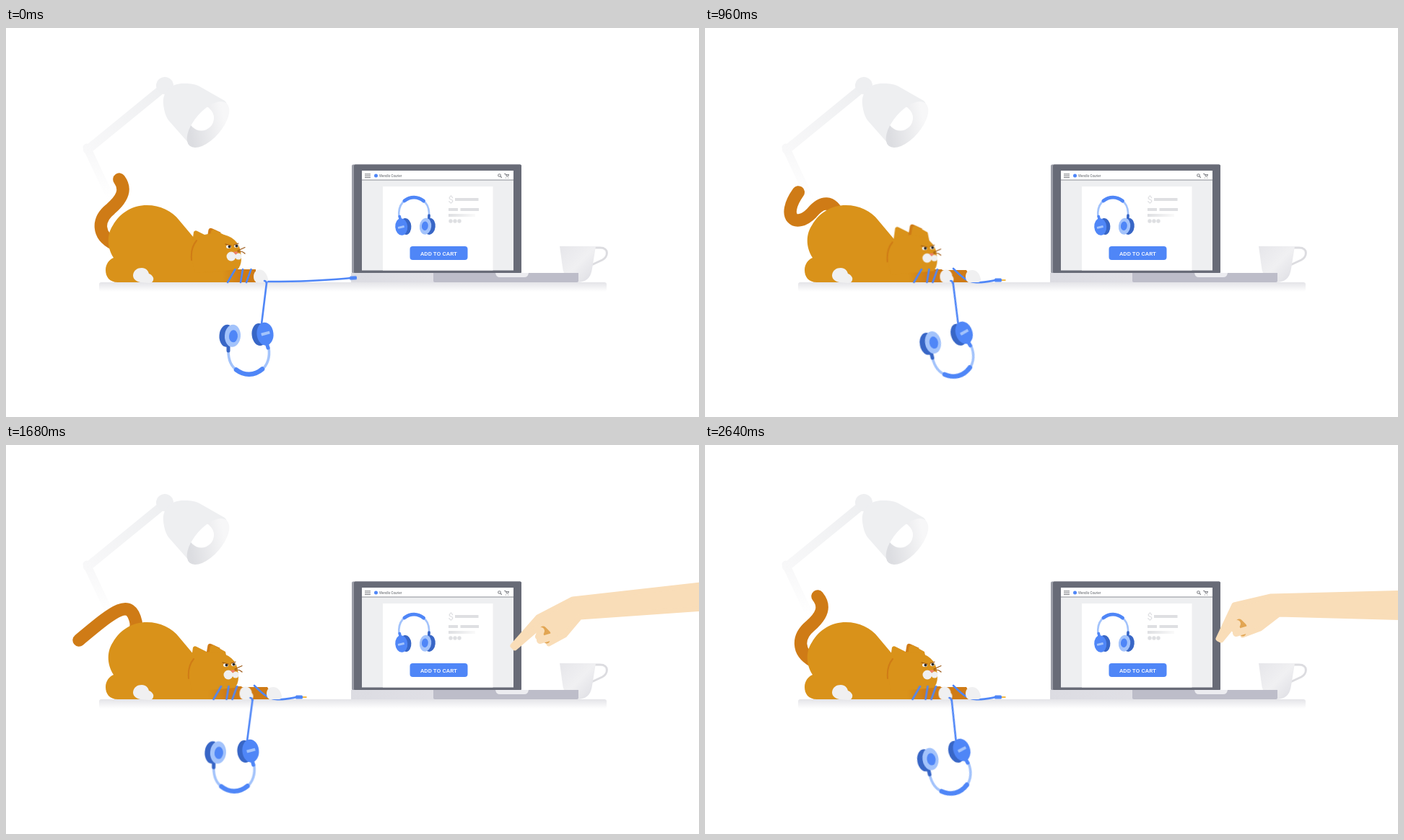
An HTML page without scripts that plays this animation: 960 by 540 pixels, repeating every 2720 ms.

```html
<!DOCTYPE html>
<html lang="en">
<head>
<meta charset="utf-8">
<title>Cat and headphones</title>
<style>
html, body { margin: 0; width: 100%; height: 100%; overflow: hidden; background: #fff; }
svg { display: block; width: 100vw; height: 100vh; }

:root { --fur: #d9921a; --dark: #cf7b16; --blue: #4f86f7; --sky: #a3c3fb; --navy: #3866c6; --skin: #f9ddb8; }
.fur { fill: var(--fur); }
.dark { fill: var(--dark); }
.paw { fill: #f0f0f1; }
.blue { fill: var(--blue); }
.sky { fill: var(--sky); }
.navy { fill: var(--navy); }
.cord { fill: none; stroke: var(--blue); stroke-width: 2.6; stroke-linecap: round; }
.line { fill: none; stroke-linecap: round; stroke-linejoin: round; }
.skin { fill: var(--skin); stroke: var(--skin); stroke-width: 7; stroke-linejoin: round; }

.anim { animation: 2720ms linear infinite; }
.tail { animation-name: tail; }
.reach { animation-name: reach; }
.cable { animation-name: cable; }
.plug { animation-name: plug; }
.tip { animation-name: tip; }
.far-paw { animation-name: far-paw; }
.pads { animation-name: pads; }
.head { animation-name: head; }
.ears { animation-name: ears; }
.pull { animation-name: pull; }
.swing { animation-name: swing; transform-origin: 361px 353px; }
.enter { animation-name: enter; }
.hand { animation-name: hand; }
.fingers { animation-name: fingers; }
.button { animation-name: press; transform-origin: 599.5px 312.5px; }

@keyframes tail {
  0%, 100% { d: path("M150 300C126 288 126 266 145 251C160 238 168 225 157 210"); }
  23.53% { d: path("M186 262C176 238 160 238 146 255C133 270 108 270 107 244"); }
  36.76% { d: path("M186 262C176 238 162 240 148 257C125 280 104 262 132 226"); }
  50% { d: path("M186 262C176 240 166 246 150 262C125 284 114 270 150 240"); }
  61.76% { d: path("M160 290C160 262 183 268 180 246C172 210 148 232 101 271"); }
  73.53% { d: path("M148 300C140 250 185 265 178 237C172 205 148 218 120 249"); }
  85.29% { d: path("M150 300C132 270 168 262 172 240C176 216 154 202 138 218"); }
  97.06% { d: path("M150 300C127 287 128 266 146 251C161 238 168 225 156 210"); }
}
@keyframes reach {
  0%, 11.76% { d: path("M300 337L345 337L347 353L300 353Z"); }
  23.53% { d: path("M308 299L339 286L343 305L316 314Z"); }
  35.29%, 100% { d: path("M318 336L362 336L372 353L318 353Z"); }
}
@keyframes far-paw {
  0%, 11.76% { transform: translate(352px, 345px); }
  23.53% { transform: translate(346px, 293px); }
  35.29%, 100% { transform: translate(371px, 345px); }
}
@keyframes pads {
  0%, 16% { opacity: 0; }
  21%, 27% { opacity: 1; }
  31%, 100% { opacity: 0; }
}
@keyframes cable {
  0%, 11.76% { d: path("M360 352C382 352 400 352 420 351C440 350 460 349 478 347"); }
  20.59% { d: path("M326 308C350 313 375 321 400 328C425 335 450 342 478 347"); }
  23.53% { d: path("M319 294C343 303 367 312 391 320C415 329 440 338 464 347"); }
  35.29%, 100% { d: path("M344 334C358 348 364 352 374 353C384 354 392 352 403 350"); }
}
@keyframes plug {
  0%, 20.58% { transform: translate(481px, 347px) rotate(-4deg); }
  23.53% { transform: translate(465px, 347.5px) rotate(8deg); }
  35.29%, 100% { transform: translate(406px, 350px) rotate(0deg); }
}
@keyframes tip {
  0%, 26.46% { opacity: 0; }
  26.47%, 100% { opacity: 1; }
}
@keyframes head {
  0%, 100% { transform: none; }
  23.53% { transform: translate(-6px, 4px); }
  38%, 99.99% { transform: translate(-4px, 2px); }
}
@keyframes ears {
  0%, 100% { transform: none; }
  23.53% { transform: translate(10px, -9px); }
  50% { transform: translate(5px, -6px); }
  61.76%, 99.99% { transform: translate(3px, -4px); }
}
@keyframes pull {
  0% { transform: none; }
  23.53% { transform: translate(-9px); }
  38%, 100% { transform: translate(-19.5px); }
}
@keyframes swing {
  0% { transform: rotate(0deg); }
  5% { transform: rotate(.5deg); animation-timing-function: ease-in-out; }
  23.53% { transform: rotate(-14deg); }
  31% { transform: rotate(-15deg); animation-timing-function: ease-in; }
  50% { transform: rotate(-3deg); animation-timing-function: ease-out; }
  61.76% { transform: rotate(.5deg); animation-timing-function: ease-in; }
  73.53% { transform: rotate(-7deg); animation-timing-function: ease-out; }
  85.29% { transform: rotate(-14deg); }
  90% { transform: rotate(-15deg); }
  97.06% { transform: rotate(-13deg); }
  100% { transform: rotate(-12deg); }
}
@keyframes enter {
  0%, 51% { transform: translate(290px); animation-timing-function: ease-out; }
  61.76%, 100% { transform: none; }
}
@keyframes hand {
  0%, 61.76% { d: path("M980 192L785 214L737 239L702 279L705 282L742 250L752 276L774 264L795 239L980 226Z"); }
  73.53% { d: path("M980 193L780 205L733 215L683 238L685 241L736 231L745 256L770 248L790 229L980 229Z"); animation-timing-function: ease-in-out; }
  85.29% { d: path("M980 221L783 267L734 290L720 337L723 338L744 300L746 325L772 313L797 287L980 259Z"); animation-timing-function: ease-in-out; }
  97.06%, 100% { d: path("M980 205L784 210L733 222L711 269L715 271L742 238L745 264L769 255L795 235L980 240Z"); }
}
@keyframes fingers {
  0%, 61.76% { transform: none; }
  73.53% { transform: translate(-6px, -15px); animation-timing-function: ease-in-out; }
  85.29% { transform: translate(0, 50px); animation-timing-function: ease-in-out; }
  97.06%, 100% { transform: translate(-4px, -10px); }
}
@keyframes press {
  0%, 80% { transform: none; }
  85.29% { transform: scale(.97); }
  90%, 100% { transform: none; }
}
</style>
</head>
<body>
<svg viewBox="0 0 960 540">
  <defs>
    <linearGradient id="armFade" gradientUnits="userSpaceOnUse" x1="218" y1="80" x2="108" y2="170">
      <stop stop-color="#eeeff1"/><stop offset="1" stop-color="#f8f8f9"/>
    </linearGradient>
    <linearGradient id="postFade" gradientUnits="userSpaceOnUse" x1="0" y1="165" x2="0" y2="238">
      <stop stop-color="#f7f7f8"/><stop offset="1" stop-color="#fff"/>
    </linearGradient>
    <linearGradient id="rimFade" gradientUnits="userSpaceOnUse" x1="255" y1="145" x2="304" y2="135">
      <stop stop-color="#dcdde1"/><stop offset="1" stop-color="#f7f7f8"/>
    </linearGradient>
    <linearGradient id="deskFade" x2="0" y2="1">
      <stop stop-color="#e4e4e8"/><stop offset="1" stop-color="#fff"/>
    </linearGradient>
    <linearGradient id="baseFade">
      <stop stop-color="#dcdce2"/><stop offset="1" stop-color="#e6e5eb"/>
    </linearGradient>
    <linearGradient id="barFade">
      <stop stop-color="#dedfe2"/><stop offset="1" stop-color="#fafafa"/>
    </linearGradient>
    <linearGradient id="mugFade" x2="1" y2="1">
      <stop stop-color="#e6e6ea"/><stop offset=".5" stop-color="#f0f0f2"/><stop offset="1" stop-color="#dcdce2"/>
    </linearGradient>
    <linearGradient id="legFade">
      <stop offset=".2" stop-color="#d9921a"/><stop offset=".65" stop-color="#cf7b16"/>
    </linearGradient>
    <clipPath id="rim"><ellipse cx="280" cy="134" rx="39" ry="19" transform="rotate(-49 280 134)"/></clipPath>

    <g id="phones">
      <g class="line" stroke-width="3.6">
        <path stroke="var(--sky)" d="M308 448C308 461 312 470 320 475M364 444C366 458 362 468 354 475"/>
        <path stroke="var(--blue)" stroke-width="6.5" d="M319 474.500C330 483 344 483 355 473.500"/>
        <path stroke="var(--navy)" stroke-width="5" d="M308 440V448"/>
        <path stroke="var(--blue)" stroke-width="5" d="M361 437L363 444"/>
      </g>
      <g transform="rotate(4 310 427)">
        <ellipse class="navy" cx="306" cy="427.500" rx="10.500" ry="15.500"/>
        <ellipse class="sky" cx="314" cy="427" rx="11" ry="15.500"/>
        <ellipse class="blue" cx="315" cy="427.500" rx="6" ry="8.500"/>
      </g>
      <g transform="rotate(-6 356 425)">
        <ellipse class="navy" cx="351" cy="425" rx="10.500" ry="15.500"/>
        <ellipse class="blue" cx="359" cy="425" rx="11.500" ry="16"/>
        <rect class="sky" x="353.500" y="422.500" width="12" height="4" rx=".5" transform="rotate(-9 359 424)"/>
      </g>
    </g>
  </defs>

  <!-- lamp -->
  <g fill="#eeeff1">
    <path class="line" stroke="url(#postFade)" stroke-width="11" stroke-linecap="butt" d="M112 166L146 238"/>
    <path class="line" stroke="url(#armFade)" stroke-width="12" d="M113 169L218 83"/>
    <circle cx="220" cy="80" r="12"/>
    <path d="M218 106C216 89 228 77 246 77C256 77 262 78 268 81L303 101C312 108 302 132 290 146C276 162 260 168 254 161L225 128C221 122 219 115 218 106Z"/>
    <g clip-path="url(#rim)">
      <rect x="240" y="90" width="75" height="80" fill="url(#rimFade)"/>
      <circle cx="270.500" cy="125" r="17.500" fill="#fff"/>
    </g>
  </g>

  <rect x="129" y="353" width="703" height="13" rx="3" fill="url(#deskFade)"/>

  <!-- mug -->
  <path class="line" stroke="#dcdce0" stroke-width="3" d="M814 305H823C836 305 834 318 826 322L811 329"/>
  <path fill="url(#mugFade)" d="M767 303H817L812 334C810 348 803 353 790 353C778 352 772 342 771 332Z"/>

  <!-- laptop -->
  <rect x="479" y="189.500" width="235" height="151" rx="2" fill="#9b9da7"/>
  <rect x="482" y="189.500" width="232" height="151" rx="2" fill="#686b77"/>
  <rect x="493" y="198" width="210" height="138.500" fill="#eeeff1"/>
  <rect x="493" y="198" width="210" height="13" fill="#fff"/>
  <path stroke="#8b8d94" d="M493 211H703"/>
  <rect x="478" y="340" width="314" height="13" fill="url(#baseFade)"/>
  <path fill="#bdbdc9" d="M592 340H793V351Q793 353 791 353H594Q592 353 592 351Z"/>
  <path fill="#ececf0" d="M678 340H724Q723 346 718 346H684Q679 346 678 340Z"/>

  <!-- shop page -->
  <path stroke="#77797e" d="M497 202.800H505M497 205.200H505M497 207.600H505"/>
  <circle class="blue" cx="512.500" cy="205" r="2.500"/>
  <text x="517" y="206.800" font-family="Roboto, sans-serif" font-size="4.600" fill="#5f6368">Wendlo Courier</text>
  <g class="line" stroke="#85878c" stroke-width="1.100">
    <circle cx="683.500" cy="204.500" r="1.800"/><path d="M685 206L686.500 207.500M690.500 202.500H692L693.500 205.800H695.500L696.500 203.500H692.500"/>
    <path d="M692.500 208h.1M695.500 208h.1"/>
  </g>
  <rect x="522" y="220" width="152.500" height="116.500" fill="#fff"/>
  <g fill="#dedfe2">
    <text x="612.500" y="243" font-family="Roboto, sans-serif" font-size="13.500">$</text>
    <path d="M622 236H654.500V240H622ZM613 250H626V254H613ZM629.500 250H655V254H629.500Z"/>
    <rect x="613" y="258" width="37" height="4" fill="url(#barFade)"/>
    <circle cx="616" cy="268" r="2.700"/><circle cx="622" cy="268" r="2.700"/><circle cx="628" cy="268" r="2.700"/>
  </g>
  <use href="#phones" transform="translate(567.500 260.500) rotate(182) scale(.74) translate(-333 -446.500)"/>
  <g class="anim button">
    <rect class="blue" x="559.500" y="303" width="80" height="19" rx="4"/>
    <text x="599.500" y="315.500" text-anchor="middle" font-family="Roboto, sans-serif" font-weight="500" font-size="8" letter-spacing=".1" fill="#fff">ADD TO CART</text>
  </g>

  <!-- cat -->
  <path class="anim tail line" stroke="var(--dark)" stroke-width="17.500" d="M150 300C126 288 126 266 145 251C160 238 168 225 157 210"/>
  <path class="anim reach dark" d="M300 337L345 337L347 353L300 353Z"/>
  <path class="anim cable cord" d="M360 352C382 352 400 352 420 351C440 350 460 349 478 347"/>
  <g class="anim plug">
    <rect class="anim tip" x="4" y="-.900" width="6.500" height="1.800" fill="#f2b233"/>
    <rect class="blue" x="-5" y="-2.500" width="10" height="5" rx="1.500"/>
  </g>
  <g class="anim far-paw">
    <path class="paw" d="M-10 0C-10-6-6-9-1-9C6-9 10-3 11 4Q11 8 7 8H-6Q-10 6-10 0Z"/>
    <g class="anim pads" fill="#e8837c">
      <circle class="paw" cx="0" cy="0" r="10.500"/>
      <circle cx="-4" cy="2" r="2.700"/><circle cx="-1" cy="-6" r="1.700"/>
      <circle cx="4" cy="-7" r="1.700"/><circle cx="6" cy="-2" r="1.700"/><circle cx="7" cy="4" r="1.700"/>
    </g>
  </g>
  <path class="fur" d="M155 353C143 353 138 345 138 336C138 328 143 321 149 319C139 303 140 286 148 274C158 256 176 246 195 246C214 246 230 254 240 267L266 298L305 325L308 353Z"/>
  <path class="paw" d="M186 353C178 351 176 347 176 343C177 336 182 333 188 333C194 333 197 337 198 341C203 343 205 347 204 350Q203 354 198 354Z"/>

  <g class="anim pull">
    <path fill="url(#legFade)" d="M288 335H346V353H288Z"/>
    <path class="paw" d="M343 345C343 339 347 335 352 335.500C357 336 360 340 360 344C363 347 363 353 358 353.500H350C345 353 343 350 343 345Z"/>
  </g>

  <g class="anim head">
    <g class="anim ears">
      <path class="fur" d="M256 312L260 283Q262 280 265 282L283 291V306Z"/>
      <path class="dark" d="M278 295L280.500 280Q282 276.500 286 278.500L298 284Z"/>
      <path class="fur" d="M280 304L284 282Q286 279 289 280L305 289L308 304Z"/>
    </g>
    <path class="fur" d="M258 322L260 300C263 290 275 285 290 285C308 286 320 293 324 306C327 318 327 328 321 335L300 337L262 340Z"/>
    <path class="line" stroke="var(--dark)" stroke-width="2" d="M264 295C258 302 256 311 257 322"/>
    <circle class="paw" cx="312" cy="317" r="6.500"/><circle class="paw" cx="322" cy="317" r="4.500"/>
    <ellipse cx="308.500" cy="303.500" rx="3.500" ry="2.500" fill="#fff"/><ellipse cx="319" cy="302.500" rx="3" ry="2.500" fill="#fff"/>
    <circle cx="309.500" cy="303.500" r="2" fill="#2c2c2c"/><circle cx="319.500" cy="302.500" r="2" fill="#2c2c2c"/>
    <g class="line" stroke="#9a5410" stroke-width="1.200">
      <path d="M304 300L312 302M316 301L322 299M321 309L331 304.500M321 310.500C326 309 329 311 331 313"/>
    </g>
    <path fill="#ef7d6f" d="M315 310.500H321Q321 313 318.500 314Q316 313 315 310.500Z"/>
  </g>

  <g class="anim pull">
    <path class="cord" d="M317.500 335L307 353M328 335L325 353M339.500 335L333 353"/>
    <path class="cord" d="M358 351Q360 351 361 354"/>
    <g class="anim swing">
      <path class="cord" d="M361 354L354 411"/>
      <use href="#phones"/>
    </g>
  </g>

  <!-- hand -->
  <g class="anim enter">
    <path class="anim hand skin" d="M980 192L785 214L737 239L702 279L705 282L742 250L752 276L774 264L795 239L980 226Z"/>
    <g class="anim fingers line">
      <path stroke="#e2a552" stroke-width="9" d="M744 256L750 262L749 271"/>
      <path stroke="var(--skin)" stroke-width="10" d="M741 258L738 266M760 265L740 271"/>
    </g>
  </g>
</svg>
</body>
</html>
```
